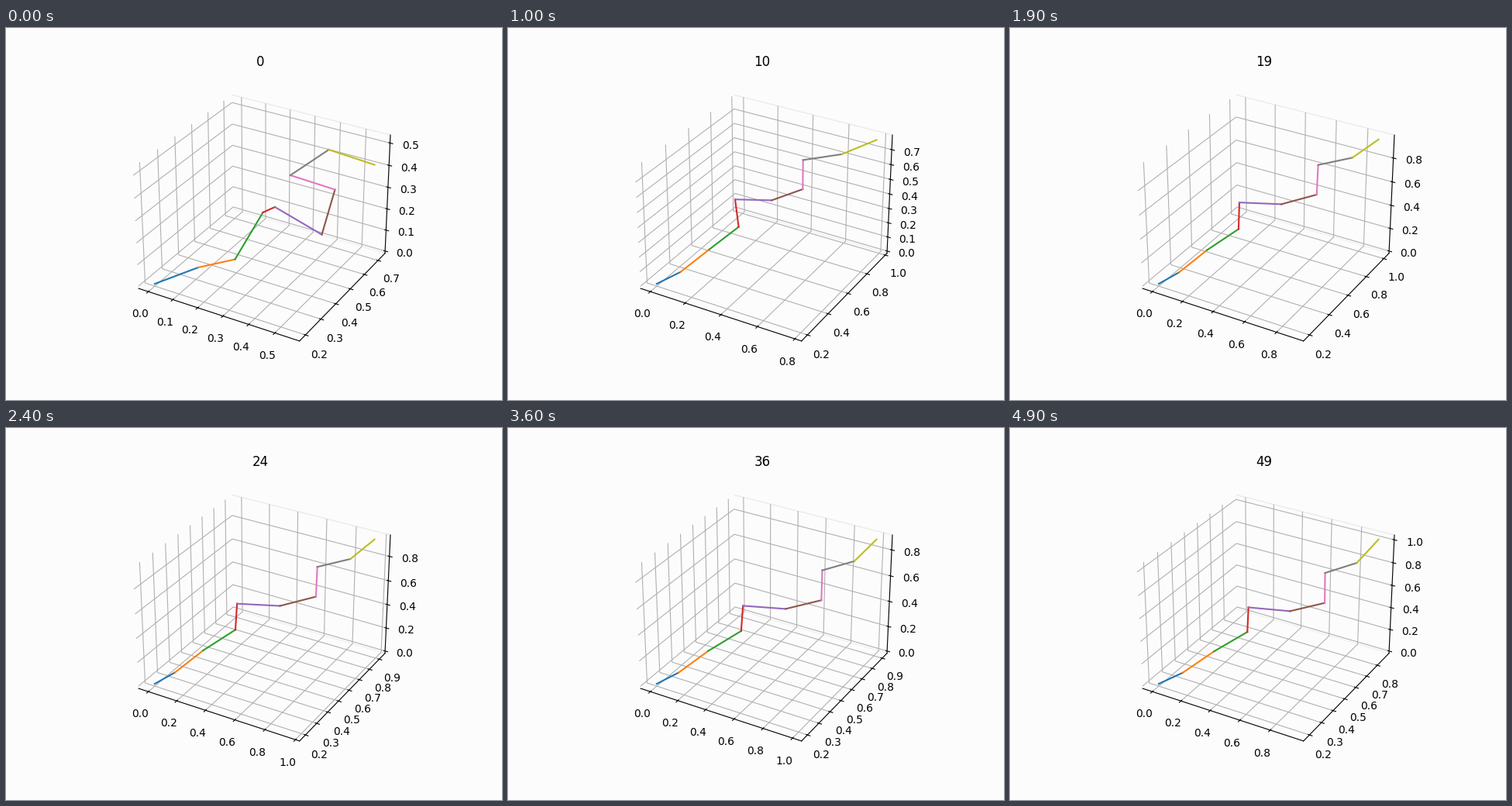
Animation, 640 px wide and 480 px high, one loop 5000 ms. Source, as a matplotlib script:

```python
import numpy as np
import matplotlib.pyplot as plt
from matplotlib.animation import FuncAnimation
from matplotlib.ticker import MaxNLocator

WIDTH, HEIGHT, DPI = 640, 480, 100
FRAMES, INTERVAL = 50, 100
BACKGROUND = "#fcfcfc"
Y_START = 0.2
SETTLED_FRAME = 10

# Projected path in stage pixels: at the start, and once it has settled.
FIRST_PATH = np.array([
    (191.9, 330.1), (248, 309), (295.5, 298.5), (331.5, 238), (347, 231),
    (407.5, 266.5), (424.5, 208.5), (367, 190), (416.5, 157), (475.5, 176.5)])
SETTLED_PATH = np.array([
    (191.9, 330.1), (222, 315), (259, 285.5), (297, 257), (292, 221),
    (339, 221.5), (379.5, 208), (381, 170), (431, 163), (475.5, 143.8)])

fig = plt.figure(figsize=(WIDTH / DPI, HEIGHT / DPI), dpi=DPI,
                 facecolor=BACKGROUND)
ax = fig.add_subplot(projection="3d", facecolor=BACKGROUND)
for axis, edge in ((ax.xaxis, BACKGROUND), (ax.yaxis, "#ebebeb"),
                   (ax.zaxis, "#f3f3f3")):
    axis.set_pane_color(BACKGROUND)
    axis.pane.set_edgecolor(edge)

overlay = fig.add_axes([0, 0, 1, 1])
overlay.set(xlim=(0, WIDTH), ylim=(HEIGHT, 0))
overlay.axis("off")
segments = [overlay.plot([], [], color=f"C{i}", lw=1.5)[0] for i in range(9)]
locator = MaxNLocator(nbins=8, steps=[1, 2, 2.5, 5, 10])


def decay(frame, time):
    return np.exp(-frame / time)


def wave(frame, peak, period):
    return np.cos(2 * np.pi * (frame - peak) / period)


def extents(frame):
    """Size of the data along x, y and z: fast growth, then a slow wobble."""
    x = 0.985 - 0.45 * decay(frame, 10.5) + 0.035 * wave(frame, 30, 36)
    y = (0.8025 - 0.0026 * frame - 0.238 * decay(frame, 2)
         + 0.05 * wave(frame, 19.3, 13))
    z = 0.96 - 0.405 * decay(frame, 10) + 0.07 * wave(frame, 19, 28)
    return x, y, z


def path_at(frame):
    """Settle into shape, then drift right and down with a slight sway."""
    path = SETTLED_PATH + (FIRST_PATH - SETTLED_PATH) * decay(frame, 2.5)
    late = max(0, np.log((frame + 1) / (SETTLED_FRAME + 1))
               / np.log(FRAMES / (SETTLED_FRAME + 1)))
    along = np.linspace(0, 1, len(path))
    path += late * np.outer(np.sin(np.pi * along ** 2), (27, 18))
    path[:, 0] -= 7 * np.sin(np.pi * late) * np.sin(2 * np.pi * along)
    return path


def scale_axis(set_lim, axis, start, extent, margin):
    low, high = start - margin * extent, start + (1 + margin) * extent
    pad = (high - low) / 48
    set_lim(low - pad, high + pad)
    ticks = [round(t, 10) + 0.0 for t in locator.tick_values(low, high)]
    axis.set_ticks([t for t in ticks if low - 1e-9 <= t <= high + 1e-9])


def update(frame):
    x, y, z = extents(frame)
    scale_axis(ax.set_xlim, ax.xaxis, 0, x, 0.05)
    scale_axis(ax.set_ylim, ax.yaxis, Y_START, y, 0.05)
    scale_axis(ax.set_zlim, ax.zaxis, 0, z, 0)

    path = path_at(frame)
    for segment, a, b in zip(segments, path, path[1:]):
        segment.set_data([a[0], b[0]], [a[1], b[1]])
    ax.set_title(str(frame))
    return segments


anim = FuncAnimation(fig, update, frames=FRAMES, interval=INTERVAL,
                     init_func=lambda: update(0), repeat=True, repeat_delay=0)
plt.show()
```
